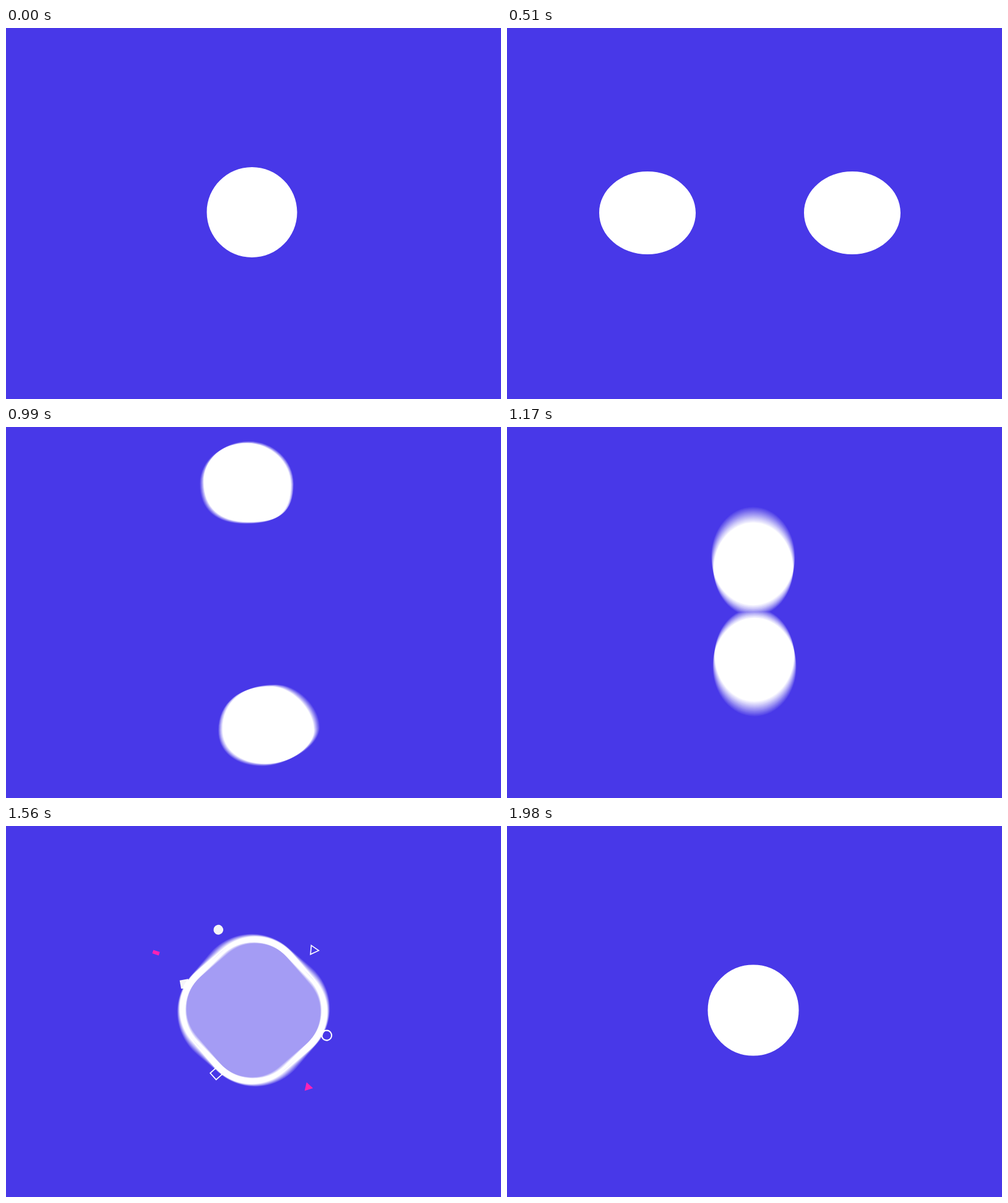
Recreate the animation shown at these times as an HTML page with a canvas. Size 800 px wide and 600 px high, loop 2.13 s.

```html
<!DOCTYPE html>
<html lang="en">
<head>
<meta charset="utf-8">
<title>Blob loop</title>
<style>
html, body { margin: 0; width: 100%; height: 100%; overflow: hidden; background: #4838e8; }
canvas { display: block; }
</style>
</head>
<body>
<canvas width="800" height="600"></canvas>
<script>
const ctx = document.querySelector('canvas').getContext('2d');
const LOOP = 2130, STEP = 30, SHUTTER = 15, SAMPLES = 15;
const PINK = '#ff22b4', PALE = '#f5f5f7';

// Smooth interpolation through [time, ...values] keys, held at both ends.
function at(keys, t) {
  const last = keys.length - 1;
  if (t <= keys[0][0]) return keys[0].slice(1);
  if (t >= keys[last][0]) return keys[last].slice(1);
  const i = keys.findIndex(k => k[0] > t) - 1;
  const a = keys[i], b = keys[i + 1], span = b[0] - a[0], u = (t - a[0]) / span;
  const slope = (j, c) => j === 0 || j === last ? 0 :
    (keys[j + 1][c] - keys[j - 1][c]) / (keys[j + 1][0] - keys[j - 1][0]);
  return a.slice(1).map((v, n) => {
    const c = n + 1, w = u * u * (3 - 2 * u);
    return v + (b[c] - v) * w +
      span * u * (1 - u) * ((1 - u) * slope(i, c) - u * slope(i + 1, c));
  });
}

// Blob key: left, top, right, bottom points, then roundness of TL, TR, BR, BL.
const oval = (t, x, y, rx, ry, tilt = 0) => [t,
  x - rx, y + tilt, x + tilt, y - ry, x + rx, y - tilt, x - tilt, y + ry,
  .552, .552, .552, .552];

const blobA = [
  oval(150, 397.5, 298, 73, 73), oval(240, 386, 298, 76, 72),
  oval(330, 342, 298, 80, 68), oval(420, 283, 299, 81, 66),
  oval(510, 227, 299, 78, 67), oval(600, 186, 299, 72, 75),
  oval(660, 192, 299, 71, 75), oval(720, 190, 296, 70, 78),
  [780, 121, 286, 193, 204, 241, 280, 195, 366, .52, .7, .67, .55],
  oval(840, 200, 250, 70, 81, 8), oval(900, 268, 160, 76, 77, 14),
  oval(945, 350, 104, 76, 70, 8),
  [990, 317, 90, 391, 25, 463, 93, 390, 155, .56, .55, .72, .65],
  oval(1050, 393, 80, 70, 72), oval(1110, 396, 115, 70, 75),
  oval(1170, 398, 220, 66, 78), oval(1230, 400, 292, 40, 42),
  oval(1260, 400, 298, 20, 20)
];
const blobB = [
  oval(150, 397.5, 298, 73, 73), oval(240, 408, 298, 76, 72),
  oval(330, 447, 298, 80, 68), oval(420, 504, 299, 81, 66),
  oval(510, 558, 299, 78, 67), oval(600, 598, 299, 72, 75),
  oval(660, 592, 299, 71, 75), oval(720, 590, 300, 70, 76),
  [780, 515, 303, 582, 229, 653, 303, 580, 381, .56, .56, .56, .54],
  oval(840, 578, 345, 70, 80, 8), oval(900, 530, 428, 76, 75, 14),
  oval(945, 466, 470, 78, 68, 8),
  [990, 346, 490, 432, 418, 502, 488, 417, 546, .62, .48, .48, .6],
  oval(1050, 405, 497, 70, 71), oval(1110, 402, 470, 70, 75),
  oval(1170, 400, 378, 66, 78), oval(1230, 400, 304, 40, 42),
  oval(1260, 400, 298, 20, 20)
];
const neck = [[150, 73], [240, 70], [330, 50], [390, 22], [430, 0]];

// Centre x, half size, corner ratio, angle, fill opacity of the outlined shape.
const box = [
  [1260, 400, 15, 1, -270, 0], [1320, 400, 46, 1, -225, 0],
  [1380, 400, 101, 1, -180, 0], [1440, 400, 134, 1, -135, 0],
  [1500, 400, 130, .95, -90, .1], [1560, 400, 105, .75, -45, .5],
  [1620, 399.5, 82, .55, -10, .85], [1680, 399, 74, .47, 24.5, .96],
  [1740, 399, 73, .52, 50, .99], [1800, 398.5, 71, .66, 70, 1],
  [1890, 398, 68.5, .9, 86, 1], [1980, 398, 68, 1, 90, 1]
];
const spread = [[1440, 0], [1500, .38], [1560, .7], [1620, .9], [1680, 1],
  [1740, 1.045], [1800, 1.09], [1980, 1.11]];
const size = [[1440, 0], [1530, .7], [1620, 1], [1740, 1], [1800, .9], [1900, 0]];
const shortSize = [[1440, 0], [1530, .7], [1620, 1], [1680, 1], [1740, .15], [1770, 0]];

function addBlob([lx, ly, tx, ty, rx, ry, bx, by, tl, tr, br, bl]) {
  const mix = (a, b, k) => a + (b - a) * k;
  ctx.moveTo(lx, ly);
  ctx.bezierCurveTo(lx, mix(ly, ty, tl), mix(tx, lx, tl), ty, tx, ty);
  ctx.bezierCurveTo(mix(tx, rx, tr), ty, rx, mix(ry, ty, tr), rx, ry);
  ctx.bezierCurveTo(rx, mix(ry, by, br), mix(bx, rx, br), by, bx, by);
  ctx.bezierCurveTo(mix(bx, lx, bl), by, lx, mix(ly, by, bl), lx, ly);
}

function blobs(t) {
  const a = at(blobA, t), b = at(blobB, t);
  ctx.beginPath();
  addBlob(a);
  addBlob(b);
  if (t < 430) {
    const mid = (a[2] + b[2]) / 2, y = (a[3] + a[7]) / 2;
    const bend = 2 * at(neck, t)[0] - (a[7] - a[3]) / 2;
    ctx.moveTo(a[2], a[3]);
    ctx.quadraticCurveTo(mid, y - bend, b[2], b[3]);
    ctx.lineTo(b[6], b[7]);
    ctx.quadraticCurveTo(mid, y + bend, a[6], a[7]);
  }
  ctx.fill();
}

function boxPath([x, half, ratio, angle], inset) {
  const h = half - inset;
  ctx.save();
  ctx.translate(x, 298);
  ctx.rotate(angle * Math.PI / 180);
  ctx.beginPath();
  ctx.roundRect(-h, -h, 2 * h, 2 * h, Math.max(0, Math.min(h, half * ratio - inset)));
  ctx.restore();
}

function outline(t) {
  boxPath(at(box, t), 0);
  ctx.lineWidth = 11;
  ctx.stroke();
}

// Bits: x, y from the centre, angle, shape, colour, line width (0 = filled).
const disc = r => () => ctx.arc(0, 0, r, 0, 7);
const rect = (w, h) => () => ctx.rect(-w / 2, -h / 2, w, h);
const tri = r => () => {
  for (let i = 0; i < 3; i++) {
    const a = i * Math.PI * 2 / 3 - Math.PI / 2;
    ctx.lineTo(r * Math.cos(a), r * Math.sin(a));
  }
  ctx.closePath();
};
const bits = [
  [-81, -186, 0, disc(9.4), PALE, 0],
  [-225, -133, 30, rect(13, 7), PINK, 0],
  [-159, -61, 2, rect(16.5, 16.5), PALE, 0],
  [138.5, -139, -13, tri(10), '#fff', 2],
  [169, 58, 0, disc(9.5), '#fff', 2.5],
  [-85.5, 146, -30, rect(17, 17), '#fff', 2],
  [126, 177.5, -5, tri(9.7), PINK, 0]
];

function drawBits(t) {
  const far = at(spread, t)[0];
  for (const [x, y, angle, shape, color, line] of bits) {
    const short = x === -225;
    const s = at(short ? shortSize : size, t)[0], m = short ? Math.min(far, 1) : far;
    if (s <= 0) continue;
    ctx.save();
    ctx.translate(400 + x * m, 298 + y * m);
    ctx.rotate((angle + (t - 1680) * .1) * Math.PI / 180);
    ctx.scale(s, s);
    ctx.beginPath();
    shape();
    ctx.fillStyle = ctx.strokeStyle = color;
    ctx.lineWidth = line;
    line ? ctx.stroke() : ctx.fill();
    ctx.restore();
  }
}

function draw(t) {
  ctx.clearRect(0, 0, 800, 600);
  ctx.globalAlpha = 1;
  ctx.globalCompositeOperation = 'source-over';
  ctx.fillStyle = ctx.strokeStyle = '#fff';
  if (t < 690) return blobs(t);
  if (t > 1440) drawBits(t);

  // Motion blur: add up equal slices of the shutter time.
  ctx.globalCompositeOperation = 'lighter';
  const shape = t < 1260 ? blobs : outline;
  if (shape === outline) {
    const pose = at(box, t);
    ctx.globalAlpha = Math.max(0, Math.min(1, pose[4]));
    boxPath(pose, 2);
    ctx.fill();
  }
  ctx.globalAlpha = 1 / SAMPLES;
  for (let i = 0; i < SAMPLES; i++) shape(t + ((i + .5) / SAMPLES - .5) * SHUTTER);
}

const start = performance.now();
function frame() {
  const t = (performance.now() - start) % LOOP;
  draw(Math.floor(t / STEP) * STEP);
  requestAnimationFrame(frame);
}
frame();
</script>
</body>
</html>
```
